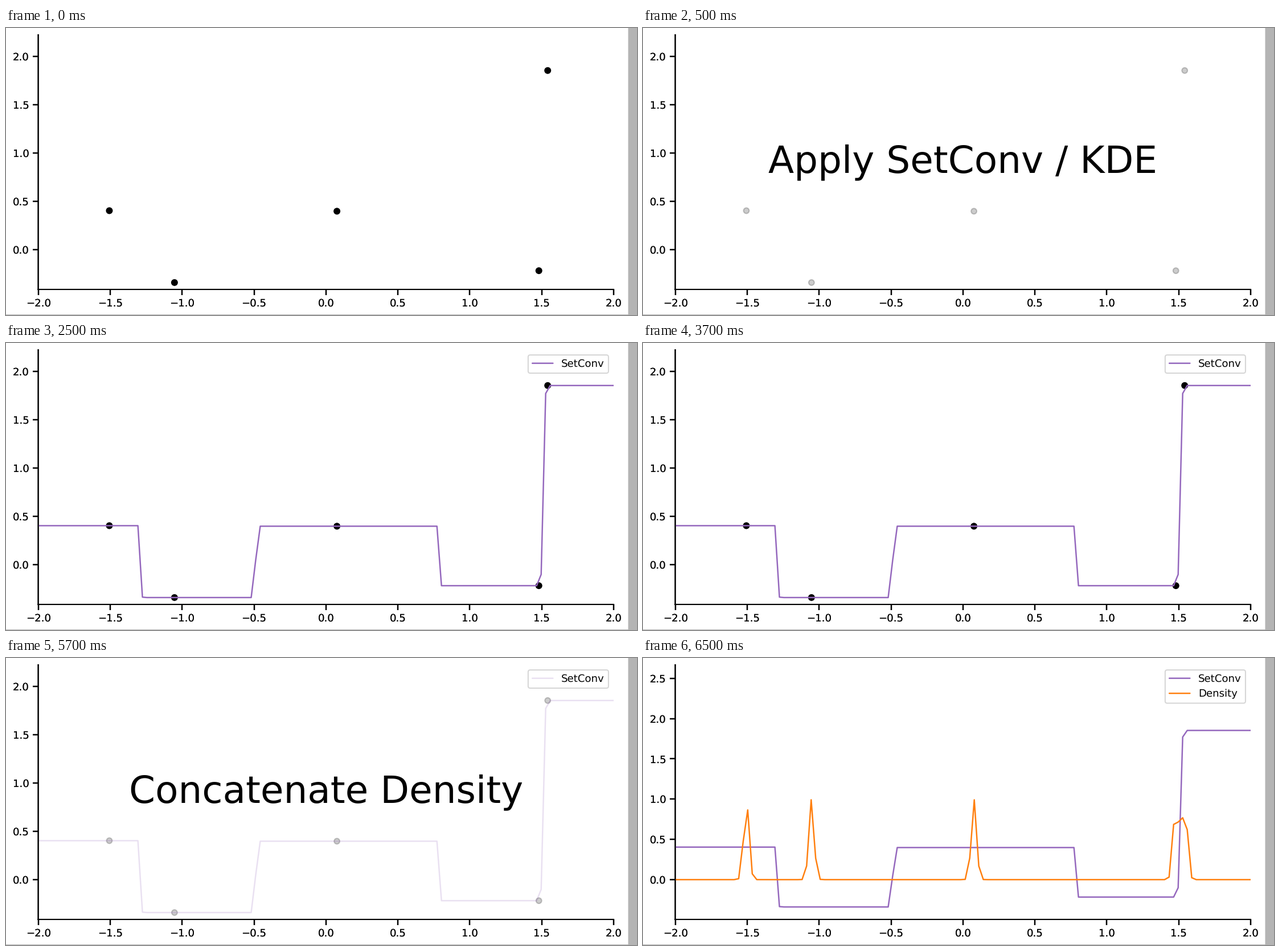
These frames come from a looping animation (1108 by 505 pixels, 8 s). A matplotlib script:

```python
import numpy as np
import matplotlib.pyplot as plt
from matplotlib.animation import FuncAnimation
from matplotlib.patches import Rectangle

W, H, DPI = 1108, 505, 148.5
LEFT, RIGHT, TOP, BOTTOM = 56.6, 1067, 12, 460
STEP_MS, STEPS = 500, 16
GREY = "#b4b4b4"
BANDWIDTH = 0.01794

plt.rcParams.update({
    "font.family": "DejaVu Sans",
    "font.size": 8.8,
    "text.hinting": "no_hinting",
    "path.snap": False,
    "axes.linewidth": 1.0,
    "axes.spines.top": False,
    "axes.spines.right": False,
    "lines.linewidth": 1.2,
    "lines.solid_capstyle": "round",
    "xtick.labelsize": 8.8,
    "ytick.labelsize": 8.8,
})

point_x = np.array([-1.5057, -1.05284, 0.0764, 1.48015, 1.54155])
point_y = np.array([0.404, -0.339, 0.3985, -0.2165, 1.853])

# Gaussian kernel on a regular grid; shifting the exponent avoids underflow.
grid = np.linspace(-2, 2, 128)
log_kernel = -0.5 * ((grid[:, None] - point_x) / BANDWIDTH) ** 2
density = np.exp(log_kernel).sum(axis=1)
weights = np.exp(log_kernel - log_kernel.max(axis=1, keepdims=True))
set_conv = weights @ point_y / weights.sum(axis=1)

NARROW, TALL = (-0.4101, 2.222), (-0.494, 2.6676)

# first step, title, dots, curve, density, y limits
SCENES = [
    (0, None, True, False, False, NARROW),
    (1, "Apply SetConv / KDE", True, False, False, NARROW),
    (5, None, True, True, False, NARROW),
    (9, "Concatenate Density", True, True, False, NARROW),
    (13, None, False, True, True, TALL),
]

fig = plt.figure(figsize=((W + 1e-6) / DPI, (H + 1e-6) / DPI), dpi=DPI, facecolor="white")
box = [LEFT / W, 1 - BOTTOM / H, (RIGHT - LEFT) / W, (BOTTOM - TOP) / H]
back = fig.add_axes(box)
front = fig.add_axes(box)


def add_bar(x, y, width, height):
    fig.add_artist(Rectangle((x / W, 1 - (y + height) / H), width / W, height / H,
                             facecolor=GREY, edgecolor="none"))


add_bar(1092.5, 0, W - 1092.5, H)
add_bar(0, 504, W, 1)


def style(ax, ylim):
    ax.cla()
    ax.patch.set_visible(False)
    ax.set(xlim=(-2, 2), ylim=ylim)
    ax.set_xticks(np.arange(-2, 2.1, 0.5))
    ax.set_yticks(np.arange(0, ylim[1], 0.5))
    ax.tick_params(length=4.8, width=1.1, pad=2.8)


def draw(step):
    _, title, dots, curve, show_density, ylim = [s for s in SCENES if s[0] <= step][-1]
    # Two stacked axes give the frame and tick labels their heavier edges.
    for ax in (back, front):
        style(ax, ylim)
    alpha = 0.2 if title else 1
    if dots:
        # One colour per dot keeps the dots at sub-pixel positions.
        front.scatter(point_x, point_y, s=4.8 ** 2, c=["black"] * len(point_x),
                      linewidths=1.0, alpha=alpha, zorder=2)
    if curve:
        front.plot(grid, set_conv, color="tab:purple", alpha=alpha, label="SetConv")
    if show_density:
        front.plot(grid, density, color="tab:orange", label="Density")
    if curve:
        front.legend(loc="upper right")
    if title:
        front.text(0.5, 0.5, title, transform=front.transAxes, fontsize=32,
                   ha="center", va="center")
    return []


anim = FuncAnimation(fig, draw, frames=STEPS, init_func=lambda: draw(0),
                     interval=STEP_MS, repeat=True, repeat_delay=0)
plt.show()
```
